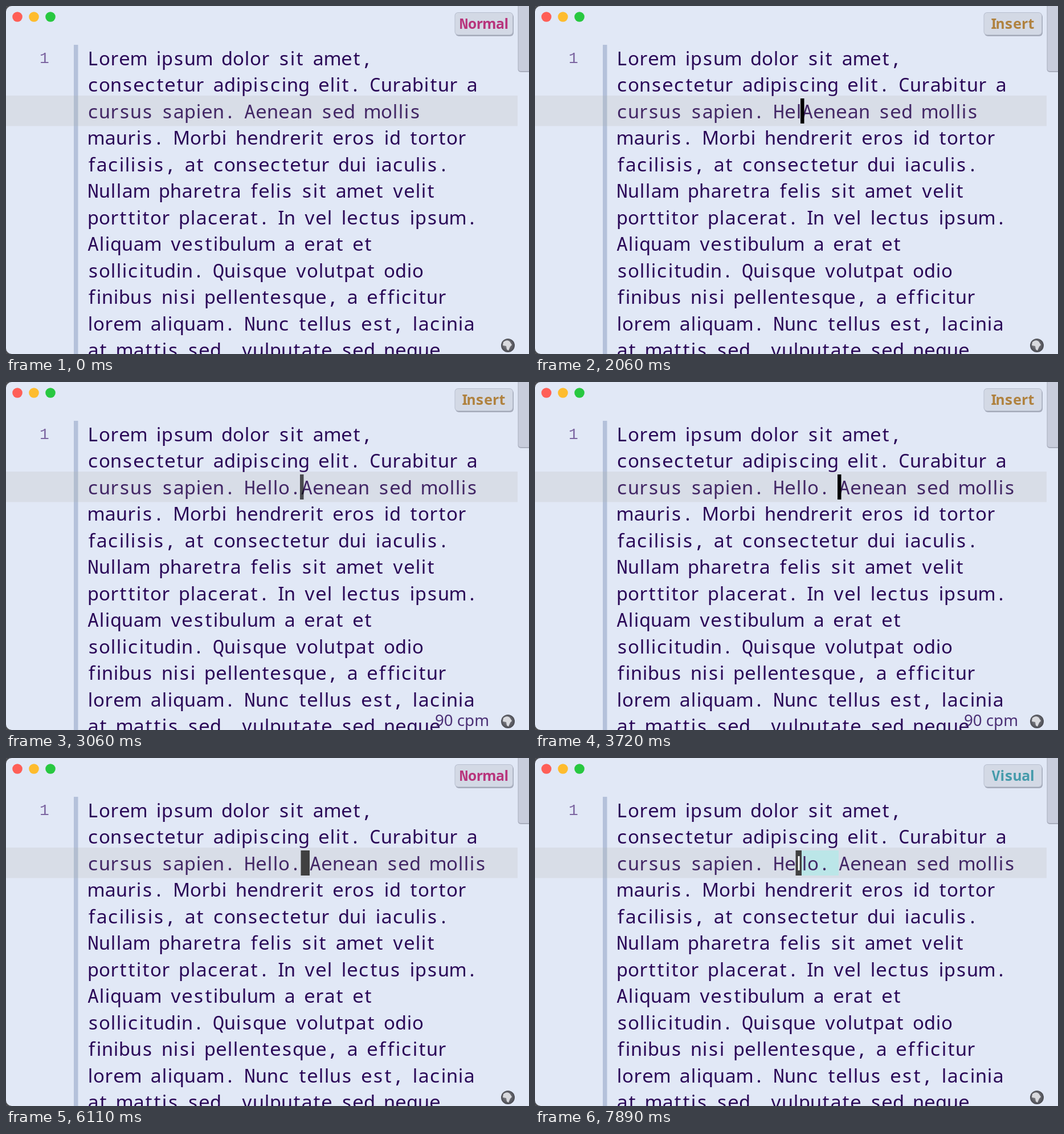
Write an HTML page with a canvas that moves like this. It is 918 px wide and 610 px high and loops after 8 s.

```html
<!DOCTYPE html>
<html lang="en">
<head>
<meta charset="utf-8">
<style>
  html, body { margin: 0; width: 918px; height: 610px; overflow: hidden; background: #4a4b50; }
  canvas { display: block; }
</style>
</head>
<body>
<canvas id="stage" width="918" height="610"></canvas>
<script>
const ctx = document.getElementById('stage').getContext('2d');
const LOOP = 8000, LEFT = 143, SIZE = 100 / 3, BLINK = 720;

const LINES = [
  'Lorem ipsum dolor sit amet,',
  'consectetur adipiscing elit. Curabitur a',
  'cursus sapien. ',
  'mauris. Morbi hendrerit eros id tortor',
  'facilisis, at consectetur dui iaculis.',
  'Nullam pharetra felis sit amet velit',
  'porttitor placerat. In vel lectus ipsum.',
  'Aliquam vestibulum a erat et',
  'sollicitudin. Quisque volutpat odio',
  'finibus nisi pellentesque, a efficitur',
  'lorem aliquam. Nunc tellus est, lacinia',
  'at mattis sed, vulputate sed neque'
];
const TYPED = 'Hello. ';
const MODE_COLORS = { Normal: '#b8347c', Insert: '#b0823f', Visual: '#459bab' };

// Key presses: time, mode, letters typed so far, cursor position
const KEYS = [
  [-BLINK, 'Normal', 0, 0],
  [440, 'Insert', 0, 0],
  [1700, 'Insert', 1, 1],
  [1890, 'Insert', 2, 2],
  [2060, 'Insert', 3, 3],
  [2220, 'Insert', 4, 4],
  [2390, 'Insert', 5, 5],
  [2500, 'Insert', 6, 6],
  [3390, 'Insert', 7, 7],
  [4670, 'Normal', 7, 6],
  [6220, 'Visual', 7, 6],
  [6830, 'Visual', 7, 5],
  [7110, 'Visual', 7, 4],
  [7610, 'Visual', 7, 3],
  [7890, 'Visual', 7, 2]
];

// Four-width type: letters take 0.5, 0.75, 1 or 1.5 cells
function cells(ch) {
  if ('ilI'.includes(ch)) return 0.5;
  if (' rtfj'.includes(ch)) return 0.75;
  return 'mwMW'.includes(ch) ? 1.5 : 1;
}

function widthOf(text, size = SIZE) {
  return [...text].reduce((sum, ch) => sum + cells(ch), 0) * size * 0.6;
}

function drawText(text, x, y, color, size = SIZE, weight = 400) {
  ctx.fillStyle = color;
  ctx.textAlign = 'center';
  for (const ch of text) {
    const family = cells(ch) === 1 ? '"Noto Sans Mono", monospace' : '"Noto Sans", sans-serif';
    const width = widthOf(ch, size);
    ctx.font = `${weight} ${size}px ${family}`;
    ctx.fillText(ch, x + width / 2, y);
    x += width;
  }
}

function drawLabel(text, x, y, color, font) {
  ctx.fillStyle = color;
  ctx.textAlign = 'center';
  ctx.font = font;
  ctx.fillText(text, x, y);
}

function rect(x, y, w, h, color, radius = 0) {
  ctx.fillStyle = color;
  ctx.beginPath();
  ctx.roundRect(x, y, w, h, radius);
  ctx.fill();
}

function disc(x, y, r, color) {
  ctx.fillStyle = color;
  ctx.beginPath();
  ctx.arc(x, y, r, 0, Math.PI * 2);
  ctx.fill();
}

function drawGlobe(x, y) {
  const shade = ctx.createRadialGradient(x - 3, y - 4, 2, x, y, 12);
  shade.addColorStop(0, '#8b8c92');
  shade.addColorStop(1, '#4a4b52');
  disc(x, y, 12, shade);
  ctx.fillStyle = '#d9dade';
  ctx.beginPath();
  ctx.moveTo(x - 8, y - 6);
  ctx.quadraticCurveTo(x - 2, y - 11, x + 3, y - 7);
  ctx.lineTo(x + 7, y - 1);
  ctx.lineTo(x + 4, y + 2);
  ctx.lineTo(x + 1, y + 9);
  ctx.lineTo(x - 2, y + 7);
  ctx.lineTo(x - 3, y + 1);
  ctx.lineTo(x - 9, y);
  ctx.fill();
}

function drawBadge(mode) {
  rect(789, 13, 102, 40, '#a4aab9', 6);
  rect(787.5, 11, 102.5, 40, '#b8bfcf', 6);
  rect(788.5, 12, 100.5, 38, '#d3d9e5', 5);
  drawText(mode, 839 - widthOf(mode, 25) / 2, 40, MODE_COLORS[mode], 25, 700);
}

function drawCursor(mode, pos, x, age) {
  const phase = age % (2 * BLINK);
  if (mode === 'Insert') {
    ctx.globalAlpha = Math.max(0, Math.min(1, (BLINK - phase) / 240));
    rect(x - 2, 162, 6.5, 44, '#000');
    ctx.globalAlpha = 1;
  } else if (phase < BLINK) {
    rect(x - 0.5, 162, widthOf(TYPED[pos]) + 0.5, 44, '#404040');
    drawText(TYPED[pos], x, 196.5, '#fff');
  }
}

function draw(t) {
  const [time, mode, count, pos] = KEYS.findLast(key => key[0] <= t);
  const start = LEFT + widthOf(LINES[2]);
  const cursorX = start + widthOf(TYPED.slice(0, pos));

  ctx.clearRect(0, 0, 918, 610);
  rect(0, 0, 930, 610, '#e1e8f6', 10);
  rect(119, 68, 7.5, 542, '#b4c1da');

  if (mode === 'Visual') {
    rect(cursorX, 162, start + widthOf(TYPED) - cursorX, 44, '#bef2f7');
  }
  LINES.forEach((line, i) => {
    const text = i === 2 ? line + TYPED.slice(0, count) + 'Aenean sed mollis' : line;
    drawText(text, LEFT, 103.5 + i * 46.53, '#2a0757');
  });
  rect(0, 157, 898, 53.5, 'rgba(171,173,160,.186)');
  drawCursor(mode, pos, cursorX, t - time);

  drawLabel('1', 67.5, 100, '#7b64a0', '28px "Liberation Mono", monospace');

  ['#ff5f57', '#febc2e', '#28c840'].forEach((color, i) => disc(20 + i * 29, 19, 8.8, color));
  rect(898.5, -8, 28, 124, '#a9aebd', 5);
  rect(899.5, -8, 28, 122, '#c8cddc', 4);
  drawBadge(mode);
  if (t >= 2220 && t < 5330) {
    drawLabel('90 cpm', 800.5, 602.5, '#4b2f75', '500 27.7px "Noto Sans", sans-serif');
  }
  drawGlobe(881, 595);
}

function tick(now) {
  draw(now % LOOP);
  requestAnimationFrame(tick);
}
requestAnimationFrame(tick);
</script>
</body>
</html>
```
